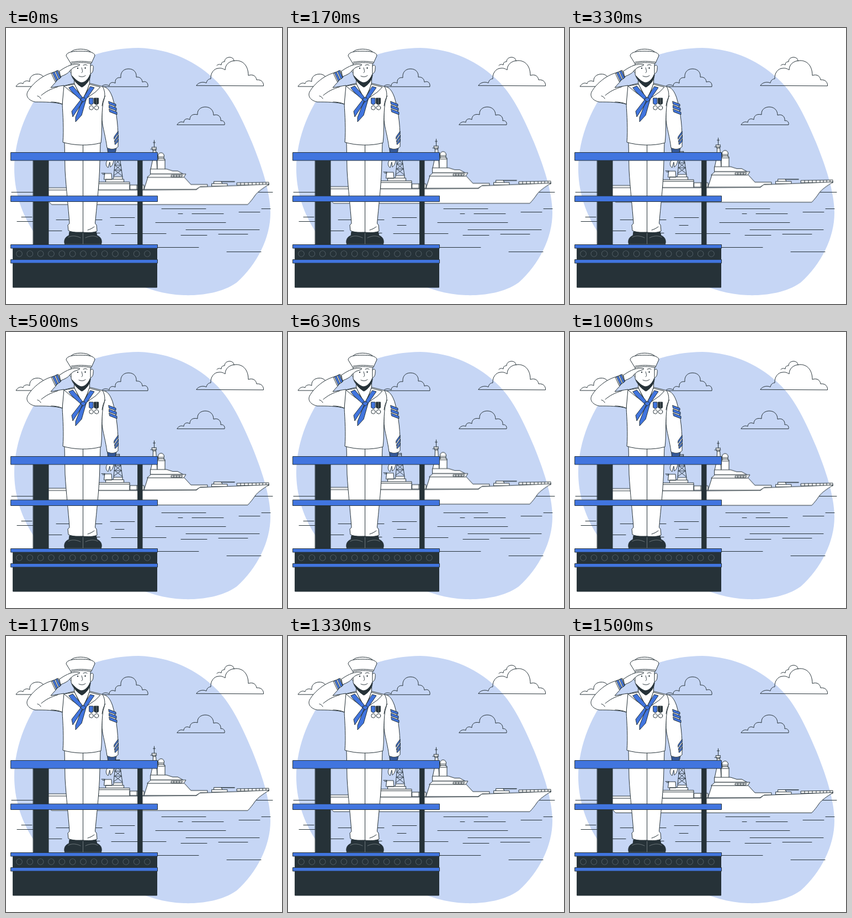
Write an HTML page without scripts that moves like this. It is 500 by 500 pixels and loops after 1540 ms.

```html
<!DOCTYPE html>
<html lang="en">
<head>
<meta charset="utf-8">
<title>Sailor saluting</title>
<style>
  html, body { margin: 0; width: 100%; height: 100%; overflow: hidden; background: #fff; }
  svg { display: block; width: 100vw; height: 100vh; }
  .art { fill: #fff; stroke: #263238; stroke-width: 1; stroke-linejoin: round; stroke-linecap: round; }
  .line { fill: none; }
  .blue { fill: #4175df; }
  .dark { fill: #263238; }
  .sky { fill: #c6d6f5; stroke: none; }
  .rivets { fill: none; stroke: #56636a; stroke-width: 11.6; stroke-linecap: round; stroke-dasharray: 0 19.33; }
  .rivets + .rivets { stroke: #263238; stroke-width: 9.8; }
  .seam { fill: none; stroke: #8a9296; stroke-width: .7; }
  .ship { animation: bob 1540ms linear -40ms infinite; }
  @keyframes bob { 50% { transform: translateY(-9.8px); } }
</style>
</head>
<body>
<svg viewBox="0 0 500 500">
  <g class="art">
    <path class="sky" d="M240 36C298 38 345 60 383 98C408 123 428 165 446 208C462 248 479 295 479 335C479 380 455 428 418 461C390 481 350 485 322 484C250 482 200 440 130 430C60 410 15 330 15 255C15 200 40 135 80 95C120 55 185 36 240 36Z"/>

    <g id="clouds" class="line">
      <path d="M345 104C349 98 357 97 363 99.500C364 94 368 92 371 92C370 82 377 73 385 73C390 72 394 74 397 76C397 66 405 59 417 59C430 59 439 69 439 86C447 83 453 87 454 94C461 93 467 97 466.500 104.500Z"/>
      <path d="M382 68C383 66 387 65 390 67C390 62 393 61 396 61C396 56 400 53 405 53C410 53 413 56 413 60"/>
      <path d="M173 106C177 102 183 102 187 105C187 99 193 97 198 100C197 92 202 89 208 90C207 80 213 74 222 74C232 74 237 81 236 89C243 88 247 93 247 98C254 95 258 100 257 106Z"/>
      <path d="M310 175C313 170 318 169 322 171C322 165 328 163 333 166C333 159 338 155 347 157C346 148 353 143 361 143C370 143 376 149 376 158C384 155 390 161 389 168C394 167 397 171 396 175Z"/>
      <path d="M70 93C69 87 63 83 56 83.500C47 84 42 90 43 97C37 94 31 97 31 101C26 98 21 101 18 106H56"/>
    </g>

    <path id="sea" class="line" d="M10 297.500H483M282 327.500H362M312 336.500H320M337 336.500H394M422 333.500H460M463 327.500H479M271 352.500H398M326 365.500H459M317 375.500H364M385 373.500H438M400 405.500H462M274 397.500H349M20 350.500H49M28 342.500H47M77 367.500H101M91 347.500H117M160 347.500H174M160 371.500H170M189 343.500H233M198 357.500H214M191 372.500H290"/>

    <g class="ship">
      <path d="M72 290H169V295H72Z"/>
      <path d="M168 279.500H224V294H168ZM168 282.500H224M225 285H250V293H225ZM237 285V293"/>
      <path d="M181 274.500H213.500V279.500H181ZM179 264H191L192 275H178ZM173 263.500H179M175 265.500H179"/>
      <path class="line" d="M199 228L195 270M205 228L211 270M198 238L208 249L197 258L210 268M207 238L197 249L209 258L195 268M197 249H208M196 258H209M184 231H206M188 228.500H206"/>
      <path d="M196 270H211V274.500H194Z"/>
      <path d="M267 222H271.500L274 257H262L266 238Z"/>
      <path d="M264.500 216.500H272.500L271 222H266Z"/>
      <path class="line" d="M268.500 204V217M266.500 208H270.500M262 220H273"/>
      <circle cx="281" cy="232" r="5.500"/>
      <path d="M276 234H286V238H288V257H274V238H276ZM274 240H288M276 236.500H286"/>
      <path d="M262 256H291L302 259.500H311L321 265H262Z"/>
      <path d="M257 271L250 293H344L352 288H365V284H335L323 271Z"/>
      <path d="M263 265H326L322 271H256Z"/>
      <path class="line" d="M299.500 267H319.500L318.500 270H299.500ZM304 267V270M309 267V270M314 267V270"/>
      <path d="M373 282.500H401V287H373ZM377 278.500H390L392 282.500H377Z"/>
      <path stroke-width="1.500" d="M390 278.800H414"/>
      <path d="M418.500 281L476 280V285H418.500ZM425 281V285M432 281V285M439 281V285M446 281V285M453 281V285M459 281V285M465 280.500V285M471 280.500V285"/>
      <path d="M70 294H250L345 293.300L351 288.500L419 286L477 283.500C465 291 456 297 451 304C447 310 443 315 438 320.300H83C79 318 77 314 74 304Z"/>
    </g>

    <path class="dark" d="M49.500 240H77V392H49.500ZM239 240H247V392H239Z"/>

    <g id="sailor">
      <path class="dark" d="M106.500 391.500C104 384 108 378 114 376L115 369H163L165 376C171 378 175 384 172.500 391.500Z"/>
      <path class="seam" d="M139.500 372V391M113 379C120 375 129 377 135 380M166 379C159 375 150 377 144 380"/>
      <path d="M106 207L107 258C109 292 113 325 115 354L112 357L113 367C121 371 132 370 139.500 370C148 371 158 371 165 368L164 357L161.500 354C164 325 168 292 169.500 258L171 207Z"/>
      <path class="line" d="M139.500 212V370M148 366C152 365 156 363 160 360"/>

      <path d="M185 219L183.500 240C180 244 181 251 185 253C186 249 187 246 188 243L189 252C192 250 195 245 195 238L198 219Z"/>
      <path class="blue" d="M184 217H200L198 225H185ZM184 220H199M185 222.500H199"/>
      <path d="M174 106C184 106 189 115 193 126C201 152 204 185 203 215C199 220 190 221 183 217C181 199 175 180 174 167Z"/>

      <path d="M104 105L124 100H151L175 106C181 117 179 126 176 135C172 160 175 184 172 208C151 214 123 213 103 207C105 184 103 158 102 138Z"/>
      <path class="line" d="M180 123C177 128 175 133 174 141"/>
      <g class="blue">
        <path d="M186 133L199 138V142L187 138ZM187 140L200 145V149.500L187 145ZM187 147L201 152.500V157L188 152Z"/>
        <path d="M196 197L203 187V191L196 201ZM197 203L203.500 194V198L197 207ZM197 209L203.500 201V205L198 211Z"/>
      </g>

      <path d="M84 81C64 86 46 103 39 116C35 125 43 132 53 134C70 134 88 134 102 138L105 104C97 105 88 107 81 108L91 97Z"/>
      <path class="line" d="M94 106.500C82 110 72 115 64 122M102 138C96 135 89 134 82 134M57 123C60 124 62 126 63 128"/>
      <path d="M82.500 82L94.500 76.500L100 89L89.500 97Z"/>
      <path class="blue" d="M84.500 81L87.500 79.500L94 93.500L91 95.500ZM90 78.500L93 77.200L99 90L96 92Z"/>

      <path d="M123 88L124 102L139 129L151 104L152 88Z"/>
      <path d="M153 69C156 65 159 68 158 73C158 79 156 83 152 83ZM119 69C115 65 113 69 115 75C115 80 118 82 120 82Z"/>
      <path d="M118 62V84C120 93 131 104 137.500 107C144 104 152 95 153 86V62Z"/>
      <path class="dark" d="M120 87C126 94 132 98.500 137 99C143 98.500 149 93 152.500 84C152.500 95 144 104 137.500 107C131 104 123 95 120 87Z"/>
      <path class="line" d="M137 72C138 76 140 80 137 81M132 87C136 89 141 89 144 86M140 67.500C143 66 145 66 147 67.500"/>
      <path d="M118 43C123 36.500 147 36.500 153 43Z"/>
      <path d="M109 50C110 43 122 42 135 42C148 42 160 43 161 50L154.500 64.500C143 62 128 62 118 64.500Z"/>
      <path class="line" d="M118 62C130 59.500 143 60 155 62"/>
      <path d="M97 78C104 73 110 70 116 67.500C122 66 129 64.500 134 66.500C132 69 127 69.500 124 71C121 72 119 75 116 77C113 82 107 85 99 88Z"/>
      <path class="line" stroke-width="2" d="M130 72.500V73.300M143.500 72V73"/>

      <path d="M124 102L105 105L117 115L138 131ZM151 102L171 107L162 116L142 130Z"/>
      <path class="blue" d="M114 108L121 105L139 126L137 132L118 114ZM153 106L160 108L144 131L140 127Z"/>
      <path class="blue" d="M136 129L119 151L121 161L140 132ZM138 132L126 162L126 170L137 158L145 130Z"/>
      <path class="blue" d="M136 127L142 126L145 130L140 134L136 131Z"/>
      <path class="blue" d="M151 127H158V137L154.500 139L151 137Z"/>
      <path class="dark" d="M160 127H167.500V137L164 139L160 137Z"/>
      <path class="seam" d="M164 127V138"/>
      <circle cx="154.500" cy="144.500" r="3.700"/>
      <circle cx="164" cy="144.500" r="3.700"/>
    </g>

    <g id="platform">
      <path class="dark" d="M13 396H273.500V470H13Z"/>
      <path class="blue" d="M9 225.500H274.500V240H9ZM9 304.200H274.500V314.500H9ZM9 392.500H274.500V399H9ZM9 419.500H274.500V426H9Z"/>
      <path class="rivets" d="M24 409H256.500"/>
      <path class="rivets" d="M24 409H256.500"/>
    </g>
  </g>
</svg>
</body>
</html>
```
